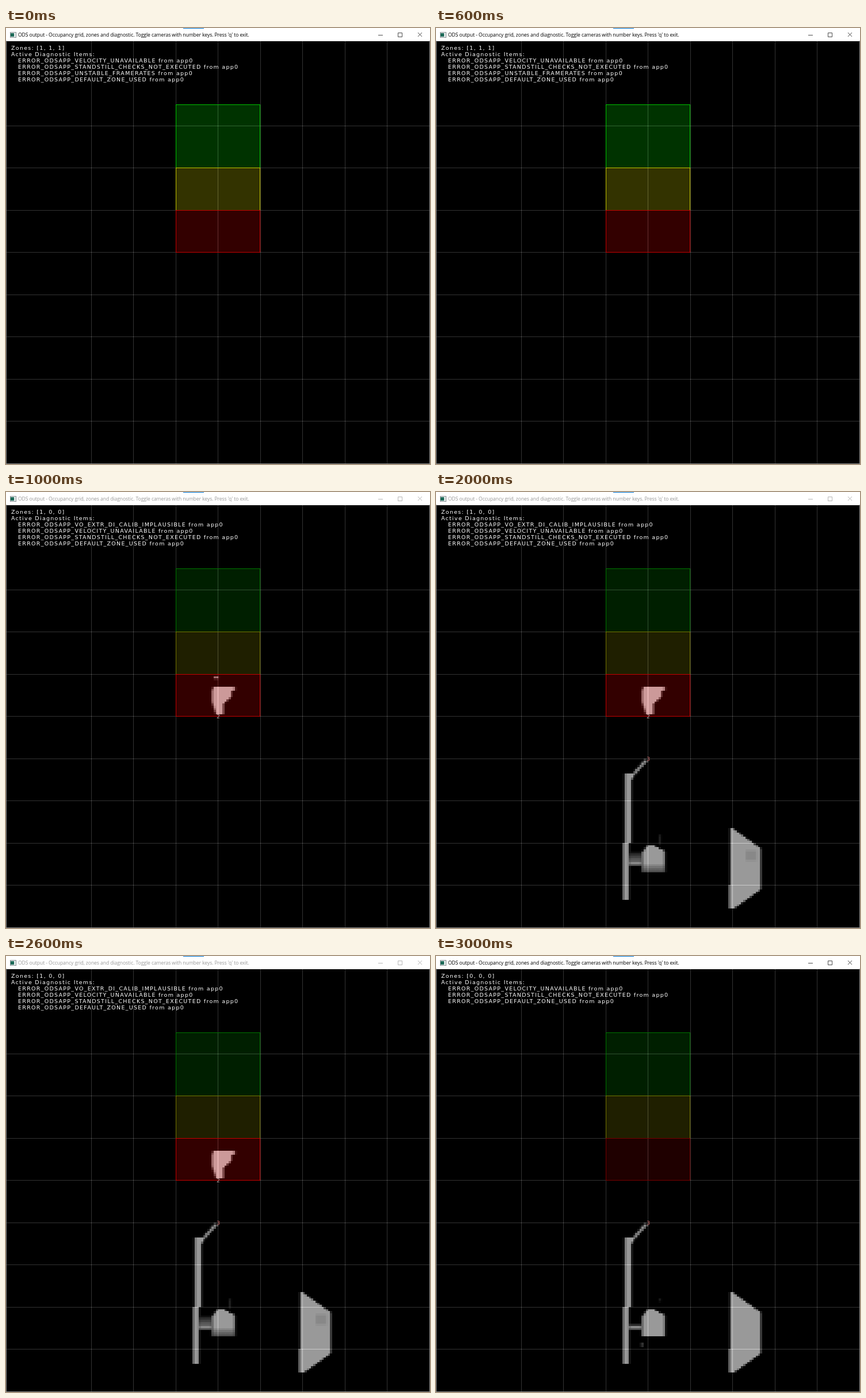
Animation, 737 px wide and 759 px high, one loop 4 s. Source, as an HTML page with a canvas:

```html
<!DOCTYPE html>
<html lang="en">
<head>
<meta charset="utf-8">
<title>Occupancy grid</title>
<style>
  html, body { margin: 0; width: 100%; height: 100%; overflow: hidden; background: #000; }
  canvas { display: block; }
</style>
</head>
<body>
<canvas id="view" width="737" height="759"></canvas>
<script>
const ctx = document.getElementById('view').getContext('2d');
const LEFT = 1, TOP = 23, SIZE = 735, CELLS = 200;
const CELL = SIZE / CELLS, STEP = SIZE / 10;
const MONO = '9.5px "DejaVu Sans", sans-serif';
const { min, max, abs } = Math;
const gray = v => `rgb(${v},${v},${v})`;

// Occupancy map: one pixel per cell, drawn in stage coordinates
const map = document.createElement('canvas');
map.width = map.height = CELLS;
const occ = map.getContext('2d');
occ.scale(1 / CELL, 1 / CELL);
occ.translate(-LEFT, -TOP);

const VELOCITY = 'VELOCITY_UNAVAILABLE';
const STANDSTILL = 'STANDSTILL_CHECKS_NOT_EXECUTED';
const DEFAULT_ZONE = 'DEFAULT_ZONE_USED';
const CALIB = 'VO_EXTR_DI_CALIB_IMPLAUSIBLE';
const blocked = [CALIB, VELOCITY, STANDSTILL, DEFAULT_ZONE];

const states = [
  { active: true, zones: [1, 1, 1], errors: [VELOCITY, STANDSTILL, 'UNSTABLE_FRAMERATES', DEFAULT_ZONE] },
  { zones: [1, 0, 0], errors: blocked, near: true, speck: true },
  { zones: [1, 0, 0], errors: blocked, near: true, far: true, hazy: true },
  { active: true, zones: [0, 0, 0], errors: [VELOCITY, STANDSTILL, DEFAULT_ZONE], far: true }
];

function block(x, y, w, h, fill) {
  occ.fillStyle = fill;
  occ.fillRect(x, y, w, h);
}

// Fills whole cell rows between two edge formulas, with a dim rim
function shape(y0, y1, left, right, fill = gray(153)) {
  const first = Math.round((y0 - TOP) / CELL), last = Math.round((y1 - TOP) / CELL);
  for (const [pad, style] of [[2, gray(45)], [0, fill]]) {
    for (let row = first; row < last; row++) {
      const y = TOP + row * CELL, mid = y + CELL / 2;
      const l = left(mid) - pad, r = right(mid) + pad;
      if (r > l) block(l, y, r - l, CELL, style);
    }
  }
}

function fade(y0, y1, from, to) {
  const g = occ.createLinearGradient(0, y0, 0, y1);
  g.addColorStop(0, gray(from));
  g.addColorStop(1, gray(to));
  return g;
}

function drawNear(speck) {
  shape(339, 386,
    y => 359 + max(0, abs(y - 356) - 9) * .3,
    y => y < 345 ? 397 : max(377, 391 - max(0, y - 357) * 1.2));
  if (speck) block(361, 321, 8, 4, gray(120));
}

function drawWall() {
  occ.strokeStyle = gray(135);
  occ.lineWidth = 5;
  occ.beginPath();
  occ.moveTo(366, 467);
  occ.lineTo(345, 490);
  occ.stroke();
  shape(488, 612, () => 329, y => 339 + max(0, 502 - y) * .6);
  shape(612, 711, () => 326, () => 335);
}

function drawCart(hazy) {
  if (hazy) block(336, 627, 24, 16, fade(627, 643, 20, 110));
  block(336, 643, 24, 7, gray(135));
  shape(615, 663,
    y => 359 + max(0, 628 - y) * .7,
    y => min(397, 380 + max(0, y - 617) * 2.2),
    hazy ? fade(646, 666, 153, 50) : gray(153));
  block(387, 597, 4, hazy ? 16 : 4, gray(30));
  if (!hazy) block(356, 675, 5, 4, gray(90));
}

function drawBox(hazy) {
  shape(587, 726,
    y => y < 685 ? 512 : 510,
    y => min(564, 517 + (y - 587) * 1.4, 516 + (726 - y) * 1.4));
  if (hazy) block(538, 624, 19, 18, gray(136));
}

function drawMap(s) {
  occ.clearRect(0, 0, 800, 800);
  if (s.near) drawNear(s.speck);
  if (s.far) {
    drawWall();
    drawCart(s.hazy);
    drawBox(s.hazy);
  }
  ctx.imageSmoothingEnabled = false;
  ctx.drawImage(map, LEFT, TOP, SIZE, SIZE);
}

function drawGrid() {
  ctx.fillStyle = gray(50);
  for (let k = 2; k < 10; k++) {
    const d = Math.floor(k * STEP);
    ctx.fillRect(LEFT + d, TOP, 1, SIZE);
    ctx.fillRect(LEFT, TOP + d, SIZE, 1);
  }
}

// Distances are in grid steps from the top of the map
const zones = [
  { r: 1, g: 0, from: 4, to: 5 },
  { r: 1, g: 1, from: 3, to: 4 },
  { r: 0, g: 1, from: 1.5, to: 3 }
];

function eachZone(on, level, paint) {
  for (let i = 2; i >= 0; i--) {
    const { r, g, from, to } = zones[i];
    const v = level * (on[i] ? 1 : .6);
    const y0 = Math.floor(TOP + from * STEP), y1 = Math.floor(TOP + to * STEP);
    ctx.fillStyle = ctx.strokeStyle = `rgb(${r * v},${g * v},0)`;
    paint(LEFT + 4 * STEP, y0, 2 * STEP, y1 - y0);
  }
}

function text(str, x, y, font, color, spacing = 0) {
  ctx.font = font;
  ctx.fillStyle = color;
  ctx.letterSpacing = spacing + 'px';
  ctx.fillText(str, x, y);
}

function drawTitleBar(active) {
  const ink = active ? '#000' : '#999';
  ctx.fillStyle = '#fff';
  ctx.fillRect(0, 0, 737, TOP);
  ctx.fillStyle = '#0078d7';
  ctx.fillRect(308, 0, 36, 1);

  ctx.fillStyle = '#8a9296';
  ctx.fillRect(7, 7, 11, 10);
  ctx.fillStyle = '#e4eaea';
  ctx.fillRect(8, 8, 9, 8);
  ctx.fillStyle = '#1d6b58';
  ctx.fillRect(8, 9, 6, 6);

  text("ODS output - Occupancy grid, zones and diagnostic. Toggle cameras with number keys. Press 'q' to exit.",
    21, 15.3, '8.6px "Open Sans", sans-serif', ink, -.085);

  ctx.strokeStyle = ink;
  ctx.lineWidth = .7;
  ctx.beginPath();
  ctx.moveTo(647, 12.5);
  ctx.lineTo(655, 12.5);
  ctx.rect(681.5, 8.5, 7, 7);
  ctx.moveTo(716, 8);
  ctx.lineTo(723, 15);
  ctx.moveTo(723, 8);
  ctx.lineTo(716, 15);
  ctx.stroke();
}

function drawStatus(s) {
  const line = (str, x, row) => text(str, x, 38 + 11 * row, MONO, '#fff', 1.28);
  line(`Zones: [${s.zones.join(', ')}]`, 9, 0);
  line('Active Diagnostic Items:', 9, 1);
  s.errors.forEach((e, i) => line(`ERROR_ODSAPP_${e} from app0`, 21, i + 2));
}

function draw(s) {
  ctx.fillStyle = '#000';
  ctx.fillRect(0, 0, 737, 759);
  drawTitleBar(s.active);

  eachZone(s.zones, 51, (x, y, w, h) => ctx.fillRect(x, y, w, h));
  ctx.globalCompositeOperation = 'lighter';
  drawMap(s);
  drawGrid();
  ctx.globalCompositeOperation = 'source-over';
  ctx.lineWidth = 1;
  eachZone(s.zones, 195, (x, y, w, h) => ctx.strokeRect(x + .5, y + .5, w - 1, h));

  drawStatus(s);
  if (s.near) text('2', 366, 394, MONO, '#b8a0a0');
  if (s.far) text('3', 366, 468, MONO, '#d07070');

  ctx.strokeStyle = '#8c8c8c';
  ctx.strokeRect(.5, TOP - .5, 736, 736);
  ctx.fillStyle = '#fff';
  ctx.fillRect(1, TOP - 1, 735, 1);
}

const start = performance.now();
function tick() {
  const t = (performance.now() - start) % 4000;
  draw(states[Math.floor(t / 1000)]);
  requestAnimationFrame(tick);
}
tick();
</script>
</body>
</html>
```
